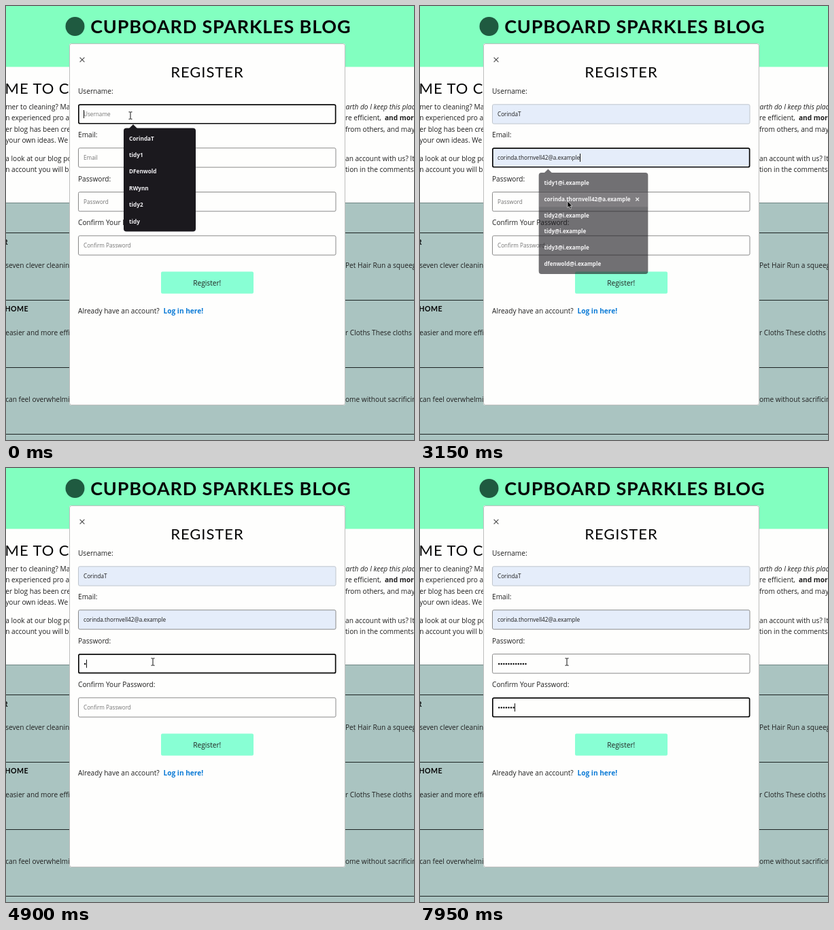
An HTML page for the animation above (8000 ms loop, 600 by 638 pixels).

```html
<!DOCTYPE html>
<html lang="en">
<head>
<meta charset="utf-8">
<title>Register form</title>
<style>
  html, body { margin: 0; width: 100%; height: 100%; overflow: hidden; background: #fefefd; }
  svg { display: block; width: 600px; height: 638px; }
  text { font: 10.15px "Open Sans", "Noto Sans", sans-serif; fill: #1f1f1f; white-space: pre; }
  .bold { font-weight: 700; }
  .italic { font-style: italic; }
  .title, .head, .sub { font-family: Lato, sans-serif; fill: #050505; }
  .title { font-size: 27px; font-weight: 700; letter-spacing: .83px; text-anchor: middle; }
  .head { font-size: 22px; letter-spacing: .95px; }
  .sub { font-size: 10.6px; font-weight: 700; letter-spacing: .45px; }
  .mid { text-anchor: middle; }
  .end { text-anchor: end; }
  .value { font-size: 8.2px; fill: #1c1c1c; }
  .hint { font-size: 8.2px; fill: #757575; }
  .item { font-size: 8.2px; font-weight: 700; fill: #f0eff2; }
  .manage { font-size: 8.6px; fill: #d8d7da; }
  .link { font-weight: 700; fill: #0a7ad6; }
</style>
</head>
<body>
<svg id="stage" viewBox="0 0 600 638"></svg>
<script>
const LOOP = 8000, DARK = '#1b191e', ROW = 24.4;
const stage = document.getElementById('stage');

function el(tag, attrs = {}, parent = stage) {
  const node = document.createElementNS('http://www.w3.org/2000/svg', tag);
  set(node, attrs);
  parent.appendChild(node);
  return node;
}
function set(node, attrs) {
  for (const key in attrs) node.setAttribute(key, attrs[key]);
}
function show(node, on) { node.style.display = on ? '' : 'none'; }
function rect(x, y, width, height, fill, more = {}, parent = stage) {
  return el('rect', { x, y, width, height, fill, ...more }, parent);
}
function text(x, y, string, cls = '', parent = stage) {
  const node = el('text', { x, y, class: cls }, parent);
  node.textContent = string;
  return node;
}
function cross(x, y, r, stroke, parent = stage) {
  return el('path', {
    d: `M${x - r} ${y - r}l${2 * r} ${2 * r}m0 ${-2 * r}l${-2 * r} ${2 * r}`, stroke, 'stroke-width': 1.3
  }, parent);
}
// A row of bullets: a dotted line with round caps.
function bullets(x, y, pitch, size, stroke, parent = stage) {
  const node = el('path', {
    fill: 'none', stroke, 'stroke-width': size, 'stroke-linecap': 'round', 'stroke-dasharray': `0 ${pitch}`
  }, parent);
  return count => {
    show(node, count > 0);
    node.setAttribute('d', `M${x} ${y}h${Math.max(0, count - 1) * pitch + 0.05}`);
  };
}

// Page behind the dialog
rect(0, 0, 600, 638, '#fefefd');
rect(0, 0, 600, 89.5, '#82ffc0');
el('circle', { cx: 101.5, cy: 30, r: 14, fill: '#1f5a40' });
text(315.8, 39.5, 'CUPBOARD SPARKLES BLOG', 'title');
rect(0, 289, 600, 349, '#aac4c1');
rect(0, 289, 600, 1, '#6f8583');
for (const y of [333, 432, 531, 629]) rect(0, y, 600, 1, '#1c2423');

text(-1.5, 129, 'ME TO C', 'head');
text(3, 351, 'R', 'sub end');
text(-1.5, 449, 'HOME', 'sub');
[
  [152, 'mer to cleaning? Maybe'], [168, 'n experienced pro and'], [185, 'er blog has been created'],
  [201, 'your own ideas. We'], [228, 'a look at our blog posts'], [244, 'n account you will be'],
  [385, 'seven clever cleaning'], [484, 'easier and more efficient'], [582, 'can feel overwhelming']
].forEach(([y, line]) => text(-.8, y, line));
text(494.5, 152, 'earth do I keep this place', 'italic');
text(499, 168, 're efficient,');
text(557, 168, 'and more', 'bold');
[
  [185, 'from others, and maybe'], [228, 'an account with us? It'], [244, 'tion in the comments!'],
  [385, 'Pet Hair Run a squeegee'], [484, 'r Cloths These cloths'], [582, 'ome without sacrificing']
].forEach(([y, line]) => text(499, y, line));

// Dialog
rect(93, 55, 406, 532, '#fefefd', { rx: 3 });
rect(93.5, 55.5, 405, 531, 'none', { rx: 3, stroke: '#000', 'stroke-opacity': .25 });
cross(112, 79, 3.4, '#555');
text(296, 105, 'REGISTER', 'head mid');
rect(228, 390.5, 136, 32.3, '#88ffd4', { rx: 2 });
text(295.8, 411, 'Register!', 'mid');
text(106, 452, 'Already have an account?');
text(231.5, 452, 'Log in here!', 'link');

const fields = [
  { label: 'Username:', hint: 'Username', y: 144.3 },
  { label: 'Email:', hint: 'Email', y: 208.3 },
  { label: 'Password:', hint: 'Password', y: 273 },
  { label: 'Confirm Your Password:', hint: 'Confirm Password', y: 337.3 }
];
for (const f of fields) {
  text(106, f.y - 15.5, f.label);
  f.box = rect(0, 0, 0, 0, '#fefefd', { rx: 2 });
  f.text = text(114, f.y + 18, '');
  f.setDots = bullets(116.2, f.y + 15, 3.57, 2.5, '#111');
}
const caret = rect(0, 0, 1, 12, '#111');

// Suggestion lists
function dropdown(top, width, items) {
  const group = el('g');
  rect(173, top - .5, width, 152, DARK, { rx: 4 }, group);
  el('path', { d: `M181 ${top}l6 -6l6 6z`, fill: DARK }, group);
  const hover = el('g', {}, group);
  rect(173, top + 3, width, ROW - 1, '#fff', { opacity: .1 }, hover);
  cross(157 + width, top + 15, 2.4, '#ddd', hover);
  items.forEach((item, i) => text(181, top + 17.6 + i * ROW, item, 'item', group));
  return { group, hover, top, items, cx: 173 + width / 2, cy: top + 76 };
}
const lists = [
  { ...dropdown(180, 106, ['CorindaT', 'tidy1', 'DFenwold', 'RWynn', 'tidy2', 'tidy']),
    open: 0, click: 900, pick: 0 },
  { ...dropdown(244, 164, ['tidy1@i.example', 'corinda.thornvell42@a.example', 'tidy2@i.example',
    'tidy@i.example', 'tidy3@i.example', 'dfenwold@i.example']),
    open: 1800, click: 3050, pick: 1 }
];

// Saved passwords panel
const panel = el('g');
rect(491, 252.5, 130, 400, DARK, { rx: 4 }, panel);
el('path', { d: 'M491.5 282l-6 6l6 6z', fill: DARK }, panel);
[
  ['CorindaT', 12], ['DFenwold', 9], ['KHolbeck', 9], ['NBrant', 9], ['KTolen', 9],
  ['OVale', 9], ['RWynn', 9], ['GAshcombe', 9], ['tidy1', 5], ['tidy2', 5]
].forEach(([name, count], i) => {
  const y = 266 + i * 35.3;
  el('circle', { cx: 504, cy: y + 6.7, r: 5.6, fill: '#2f7351' }, panel);
  text(518, y + 3, name, 'item', panel);
  bullets(519.5, y + 15, 3.57, 1.9, '#d5d4d8', panel)(count);
});
rect(491, 611.5, 109, 1, '#46444a', {}, panel);
el('circle', { cx: 505.5, cy: 626.5, r: 5, fill: '#c4c4c6' }, panel);
text(520.5, 630, 'Manage passwords...', 'manage', panel);

// Pointers
const arrow = el('path', {
  d: 'M0 0v9.6l2.2 -2l1.6 3.7l1.7 -.8l-1.6 -3.5h3z', fill: '#000', stroke: '#fff', 'stroke-width': .6
});
const beam = el('path', {
  d: 'M-2.5 -5.2h1.7l.8 .7l.8 -.7h1.7M-2.5 5.2h1.7l.8 -.7l.8 .7h1.7M0 -4.6v9.2',
  fill: 'none', stroke: '#111', 'stroke-width': 1
});

const path = [
  [0, 183, 161], [250, 183, 161], [650, 198, 192], [900, 202, 192], [1250, 202, 192],
  [1650, 204, 225.5], [2250, 204, 225.5], [2750, 217, 287], [3300, 217, 287], [3500, 216, 285], [LOOP, 216, 285]
];
function pointerAt(t) {
  const i = path.findIndex((p, k) => k > 0 && t <= p[0]);
  const [t0, x0, y0] = path[i - 1], [t1, x1, y1] = path[i];
  const u = (t - t0) / (t1 - t0), e = u * u * (3 - 2 * u);
  return [x0 + (x1 - x0) * e, y0 + (y1 - y0) * e];
}

const FOCUS = [0, 1750, 3650, 6550], FADE = 200;
const typing = [null, null, { start: 4850, step: 117, max: 12 }, { start: 7030, step: 145, max: 12 }];
function typed(i, t) {
  const k = typing[i];
  return k && t >= k.start ? Math.min(k.max, Math.floor((t - k.start) / k.step) + 1) : 0;
}

function drawField(f, i, focused, value, count) {
  const filled = value !== '';
  const line = focused ? 1.7 : 1;
  set(f.box, {
    x: 106 + line / 2, y: f.y + line / 2, width: 379.5 - line, height: 29.3 - line,
    fill: filled ? '#e5edfa' : '#fefefd',
    stroke: focused ? '#0a0a0a' : filled && i === 0 ? '#bfc5cd' : '#8a8a8a',
    'stroke-width': line
  });
  f.text.textContent = filled ? value : count ? '' : f.hint;
  f.text.setAttribute('class', filled ? 'value' : 'hint');
  f.setDots(count);
}

function draw(t) {
  const [x, y] = pointerAt(t);
  const focus = FOCUS.filter(start => t >= start).length - 1;
  const values = ['', '', '', ''];
  let overList = false;

  lists.forEach((list, i) => {
    const fade = Math.max(0, (t - list.click) / FADE);
    const visible = t >= list.open && fade < 1;
    const row = Math.floor((y - list.top - 3) / ROW);
    const hovering = visible && y > list.top && row >= 0;
    show(list.group, visible);
    show(list.hover, hovering);
    if (hovering) {
      list.hover.setAttribute('transform', `translate(0 ${row * ROW})`);
      values[i] = list.items[row];
    }
    if (t >= list.click) values[i] = list.items[list.pick];
    const scale = 1 - .04 * Math.min(1, fade);
    set(list.group, {
      opacity: 1 - .76 * Math.min(1, fade),
      transform: `translate(${list.cx} ${list.cy}) scale(${scale}) translate(${-list.cx} ${-list.cy})`
    });
    overList = overList || visible && y > list.top;
  });

  fields.forEach((f, i) => drawField(f, i, i === focus, values[i], typed(i, t)));
  show(panel, t >= 3750 && t < 4850);

  const f = fields[focus], count = typed(focus, t), list = lists[focus];
  const chosen = list && t >= list.click;
  const keys = typing[focus];
  const lastKey = count ? keys.start + (count - 1) * keys.step : chosen ? list.click : FOCUS[focus];
  const offset = chosen ? f.text.getComputedTextLength() : count * 3.6;
  set(caret, { x: Math.round(114 + offset), y: f.y + 8.7 });
  show(caret, (t - lastKey) % 1060 < 530);

  const overField = fields.some(g => y > g.y && y < g.y + 30);
  const isBeam = overField && !overList;
  show(beam, isBeam);
  show(arrow, !isBeam);
  (isBeam ? beam : arrow).setAttribute('transform', `translate(${x} ${y})`);
}

function tick() {
  draw(performance.now() % LOOP);
  requestAnimationFrame(tick);
}
tick();
</script>
</body>
</html>
```
